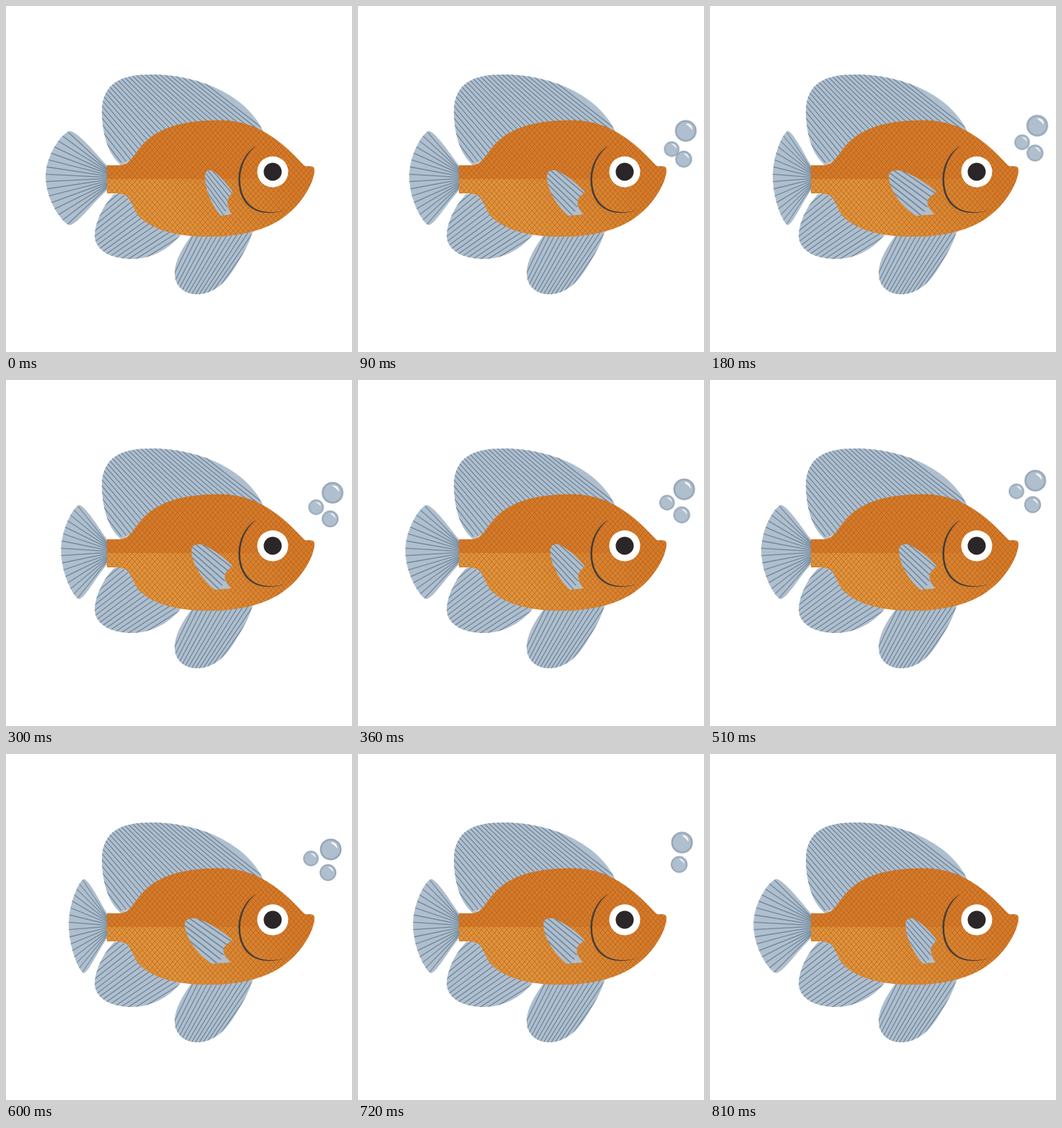
An HTML page that plays this animation: 480x480 px, repeating every 840 ms.

```html
<!DOCTYPE html>
<html lang="en">
<head>
<meta charset="utf-8">
<title>Fish</title>
<style>
  html, body { margin: 0; width: 100%; height: 100%; overflow: hidden; background: #fff; }
  svg { display: block; width: 100%; height: 100%; }
  .fin { fill: #afbfce; }
  .ray { fill: none; stroke: #70869b; stroke-width: 1.3; }
  #tail, #side { animation: 420ms infinite; animation-timing-function: steps(7); }
  #tail { transform-origin: 140px 238px; animation-name: tail; }
  #side { transform-origin: 315px 260px; animation-name: side; }
  @keyframes tail { 50% { transform: scaleX(.56); } }
  @keyframes side { 50% { transform: scaleX(1.837); } }
  .rise { animation: rise 840ms steps(28) infinite; }
  .blink { animation: blink 840ms step-end var(--wait) infinite; }
  @keyframes rise { to { transform: translate(var(--dx), var(--dy)); } }
  @keyframes blink { 0% { opacity: 1; } 78.57%, 100% { opacity: 0; } }
</style>
</head>
<body>
<svg viewBox="0 0 480 480">
  <defs>
    <path id="body" d="M140 221H155C176 221 176 203 197 185C224 163 260 158.500 299 158.500C356 159 391 198 414 221.500C417 224 427 219 428 227C428 244 411 275 384 294C357 313 320 320 280 320C235 320 201 309 185 292C173 278 175 260 155 260H140Z"/>
    <clipPath id="bodyClip"><use href="#body"/></clipPath>
    <linearGradient id="belly" gradientUnits="userSpaceOnUse" x1="160" y1="300" x2="400" y2="180">
      <stop offset=".25" stop-color="#e0933c"/>
      <stop offset=".5" stop-color="#e0933c" stop-opacity=".65"/>
      <stop offset=".88" stop-color="#e0933c" stop-opacity="0"/>
    </linearGradient>
    <pattern id="scales" width="7" height="8" patternUnits="userSpaceOnUse">
      <path d="M-.875 -1L7.875 9M7.875 -1L-.875 9" fill="none" stroke="#a4540f" stroke-opacity=".55"/>
    </pattern>
  </defs>
  <g id="backFins"></g>
  <g clip-path="url(#bodyClip)">
    <path fill="#d57a2a" d="M130 150H440V330H130Z"/>
    <path fill="url(#belly)" d="M130 240H440V330H130Z"/>
    <path fill="url(#scales)" d="M130 150H440V330H130Z"/>
  </g>
  <path fill="#443c3b" d="M347 194C332 203 322.500 221 322.500 241C322.500 273 344 297 389 283C345 294.500 325 271 325 241C325 222 333.500 205 347 194Z"/>
  <circle cx="370" cy="230" r="21.500" fill="#fff"/>
  <circle cx="370" cy="230" r="12.500" fill="#2b2627"/>
  <g id="frontFin"></g>
  <g id="bubbles"></g>
</svg>
<script>
const $ = id => document.getElementById(id);
const mix = (a, b, u) => a + (b - a) * u;

// Rays start along the segment (x0,y0)-(x1,y1) and turn from angle a0 to a1 (degrees).
function rays(n, [x0, y0], [x1, y1], a0, a1, len) {
  let d = '';
  for (let i = 0; i < n; i++) {
    const u = i / (n - 1), a = mix(a0, a1, u) * Math.PI / 180;
    d += `M${mix(x0, x1, u)} ${mix(y0, y1, u)}l${len * Math.cos(a)} ${len * Math.sin(a)}`;
  }
  return d;
}

const fin = (id, shape, lines) => `<g id="${id}">
  <clipPath id="${id}Clip"><path d="${shape}"/></clipPath>
  <path class="fin" d="${shape}"/>
  <path class="ray" d="${lines}" clip-path="url(#${id}Clip)"/></g>`;

$('backFins').innerHTML =
  fin('dorsal',
    'M160 221C140 206 133 172 133 146C134 107 159 95 202 95C265 95 334 122 358 176L300 200L200 200Z',
    rays(31, [160, 217], [364, 176], 232, 218, 190)) +
  fin('anal',
    'M150 261C135 276 123 300 123 320C125 341 148 351 175 351C202 350 224 339 242 318L200 280L165 259Z',
    rays(16, [158, 259], [244, 318], 140, 148, 130)) +
  fin('pelvic',
    'M259 316C243 337 234 355 234 371C234 389 248 400 265 400C287 400 304 385 318 362C329 344 338 329 342 313Z',
    rays(14, [261, 315], [350, 313], 116, 125, 120)) +
  fin('tail',
    'M140 221C122 202 104 179 90 173.500C81 172 55 204 55 237C55 270 80 304 89 304C102 300 117 276 140 256Z',
    rays(16, [141, 226], [141, 251], 223, 137, 110));

$('frontFin').innerHTML = fin('side',
  'M276 236C276 229 281 226 287 229C297 235 308 248 314.500 258C310 264 306 268 307.500 275C308 281 311 285 313 289L298 291C288 280 276 257 276 236Z',
  rays(8, [300, 297], [317, 255], 236, 228, 70));

const bubble = (x, y, r, dx, dy, wait) => `
  <g class="blink" style="--wait:${wait - 840}ms">
    <g class="rise" style="--dx:${dx}px;--dy:${dy}px">
      <g transform="translate(${x} ${y}) scale(${r / 15})">
        <circle r="15" fill="#94a5b6"/>
        <circle r="12.600" fill="#afbfce"/>
        <path d="M1 -9.500C5 -9.500 8 -7 8.500 -2.500C7 -5.500 4.500 -7.500 1 -9.500Z" fill="#fff" stroke="#fff" stroke-width="1.200" stroke-linejoin="round"/>
      </g>
    </g>
  </g>`;

$('bubbles').innerHTML =
  bubble(455.5, 180.4, 15, -7, -67.2, 90) +
  bubble(437.3, 207.9, 10.7, -20, -88.2, 30) +
  bubble(452.7, 220.9, 11.6, -8.4, -79, 90);
</script>
</body>
</html>
```
